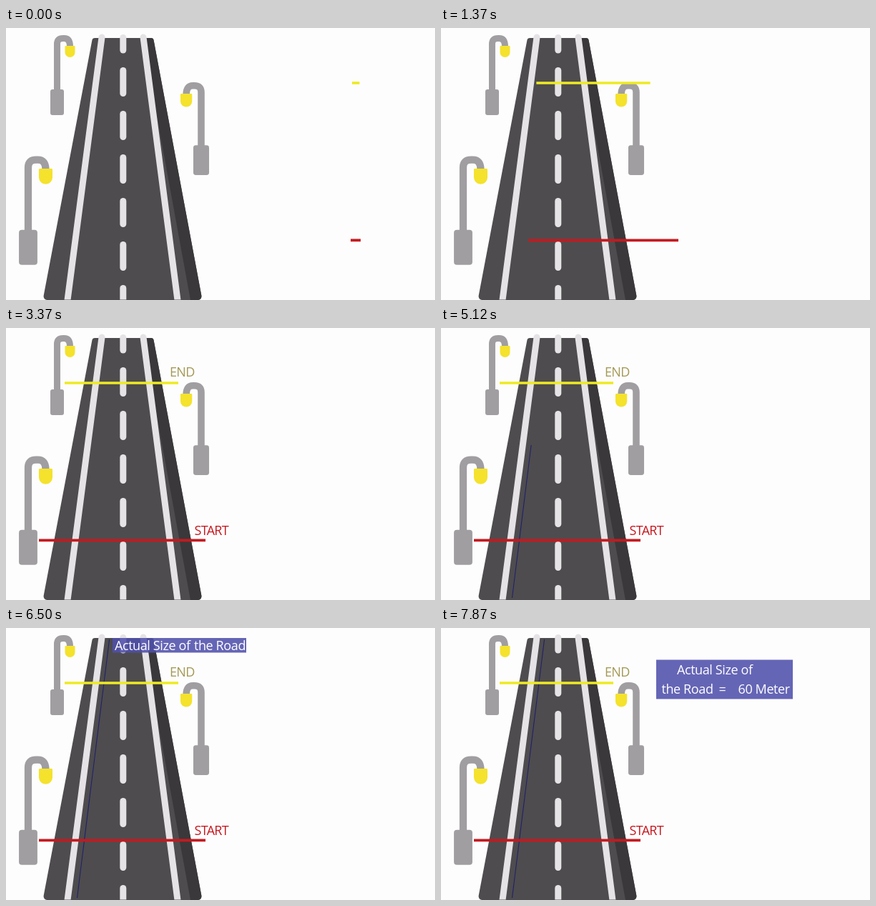
Animation of 600x381 px, one loop 8 s. Source, as an HTML page with a canvas:

```html
<!DOCTYPE html>
<html lang="en">
<head>
<meta charset="utf-8">
<title>Road size</title>
<style>
  html, body { margin: 0; width: 100%; height: 100%; overflow: hidden; background: #fefdfe; }
  canvas { display: block; width: 600px; height: 381px; }
</style>
</head>
<body>
<canvas id="stage" width="600" height="381"></canvas>
<script>
const ctx = document.getElementById('stage').getContext('2d');
const LOOP = 8000, STEP = 125;
const GRAY = '#a09ea0', PAINT = '#e5e3e5', RED = '#c5191f', YELLOW = '#eeea22';

const clamp = v => Math.min(1, Math.max(0, v));
const lerp = (a, b, p) => a + (b - a) * p;
const progress = (t, from, to) => clamp((t - from) / (to - from));

// Piecewise linear value through [time, value] points
function track(t, points) {
  let value = points[0][1];
  for (let i = 1; i < points.length; i++) {
    const [t0, v0] = points[i - 1], [t1, v1] = points[i];
    if (t >= t0) value = lerp(v0, v1, progress(t, t0, t1));
  }
  return value;
}

function line(x1, y1, x2, y2, color, width, cap = 'butt') {
  ctx.strokeStyle = color;
  ctx.lineWidth = width;
  ctx.lineCap = cap;
  ctx.beginPath();
  ctx.moveTo(x1, y1);
  ctx.lineTo(x2, y2);
  ctx.stroke();
}

function box(x, y, w, h, r, color) {
  ctx.fillStyle = color;
  ctx.beginPath();
  ctx.roundRect(x, y, w, h, r);
  ctx.fill();
}

function text(str, x, y, color, spacing = -0.4) {
  ctx.font = '18px "Open Sans", "Noto Sans", sans-serif';
  ctx.letterSpacing = spacing + 'px';
  ctx.fillStyle = color;
  ctx.fillText(str, x, y);
}

function roadPath() {
  ctx.beginPath();
  ctx.moveTo(160, 14);
  ctx.arcTo(206, 14, 274.5, 381, 4);
  ctx.arcTo(274.5, 381, 160, 381, 5);
  ctx.arcTo(51.5, 381, 121, 14, 5);
  ctx.arcTo(121, 14, 160, 14, 4);
  ctx.closePath();
}

function drawRoad() {
  ctx.save();
  roadPath();
  ctx.fillStyle = '#4e4c4e';
  ctx.fill();
  ctx.clip();
  ctx.fillStyle = '#3a383a';
  ctx.beginPath();
  ctx.moveTo(191, 14);
  ctx.lineTo(210, 14);
  ctx.lineTo(276, 381);
  ctx.lineTo(258, 381);
  ctx.fill();
  ctx.restore();

  ctx.save();
  ctx.beginPath();
  ctx.rect(0, 0, 600, 380.5);
  ctx.clip();
  line(134, 13, 85.5, 385, PAINT, 9, 'round');
  line(192, 13, 240.5, 385, PAINT, 9, 'round');
  line(163.8, 13.5, 163.8, 31, PAINT, 9, 'round');
  for (let y = 59.5; y < 381; y += 61) line(163.8, y, 163.8, y + 32, PAINT, 9, 'round');
  ctx.restore();
}

// x: pole centre, top: top of the arch, side: direction of the head
function drawLamp(x, top, s, side, headY) {
  const w = 5.5 + 3.5 * s, y = top + w / 2;
  ctx.save();
  ctx.translate(x, 0);
  ctx.scale(side, 1);
  ctx.strokeStyle = GRAY;
  ctx.lineWidth = w;
  ctx.lineCap = 'butt';
  ctx.beginPath();
  ctx.moveTo(0, top + 80 * s);
  ctx.lineTo(0, y + 8 * s);
  ctx.quadraticCurveTo(0, y, 8 * s, y);
  ctx.lineTo(10 * s, y);
  ctx.quadraticCurveTo(18 * s, y, 18 * s, headY + 1);
  ctx.stroke();
  box(-9.5 * s, top + 76 * s, 19 * s, 36 * s, 3 * s, GRAY);
  box(11 * s, headY, 14 * s, 16 * s, [s, s, 7 * s, 7 * s], '#f4e22c');
  ctx.restore();
}

// Bars glide in from the right in two moves with a rest between
function drawBar(t, y, left, right, color, width) {
  const at = v => track(t, [[375, v[0]], [750, v[1]], [1125, v[1]], [1500, v[2]]]);
  line(at(left), y, at(right), y, color, width);
}

function drawNames(t) {
  ctx.globalAlpha = progress(t, 1500, 2000);
  text('END', 229, 68, '#a39a55', -0.7);
  text('START', 263.5, 290, RED, -0.7);
  ctx.globalAlpha = 1;
}

function drawMeasure(t) {
  const tip = track(t, [[3875, 378], [4125, 358], [4375, 340], [4625, 301],
    [4875, 287], [5125, 164], [5625, 16]]);
  if (tip < 378) line(99.5, 378, 99.5 + (378 - tip) * 0.1245, tip, '#20206c', 1.1);
}

function drawLabel(t) {
  const show = progress(t, 6000, 6375);
  if (!show) return;
  const p = progress(t, 6500, 6875);
  ctx.globalAlpha = show;
  box(lerp(149, 301, p), lerp(14, 44.5, p), lerp(187, 191, p), lerp(20.5, 55, p), 0,
    'rgba(80, 80, 172, 0.88)');
  text('Actual Size of', lerp(152, 330, p), lerp(30.5, 65, p), '#fff');
  text('the Road', lerp(263, 308.5, p), lerp(30.5, 92, p), '#fff');
  ctx.globalAlpha = progress(t, 6625, 6875);
  text('=', 388.5, 92, '#fff');
  text('60 Meter', 415.5, 92, '#fff');
  ctx.globalAlpha = 1;
}

function draw(t) {
  ctx.fillStyle = '#fefdfe';
  ctx.fillRect(0, 0, 600, 381);
  drawRoad();
  drawLamp(71.5, 10, 1, 1, 25);
  drawLamp(31, 179.5, 1.36, 1, 197);
  drawLamp(273, 76, 1.16, -1, 92);
  drawMeasure(t);
  drawBar(t, 77, [484, 236, 82], [494.5, 396, 241], YELLOW, 3.6);
  drawBar(t, 297.3, [482, 275, 46], [496, 438, 279], RED, 3.8);
  drawNames(t);
  drawLabel(t);
}

// Motion runs at eight poses per second
const start = performance.now();
function tick() {
  const t = (performance.now() - start) % LOOP;
  draw(Math.floor((t + 5) / STEP) * STEP % LOOP);
  requestAnimationFrame(tick);
}
tick();
</script>
</body>
</html>
```
